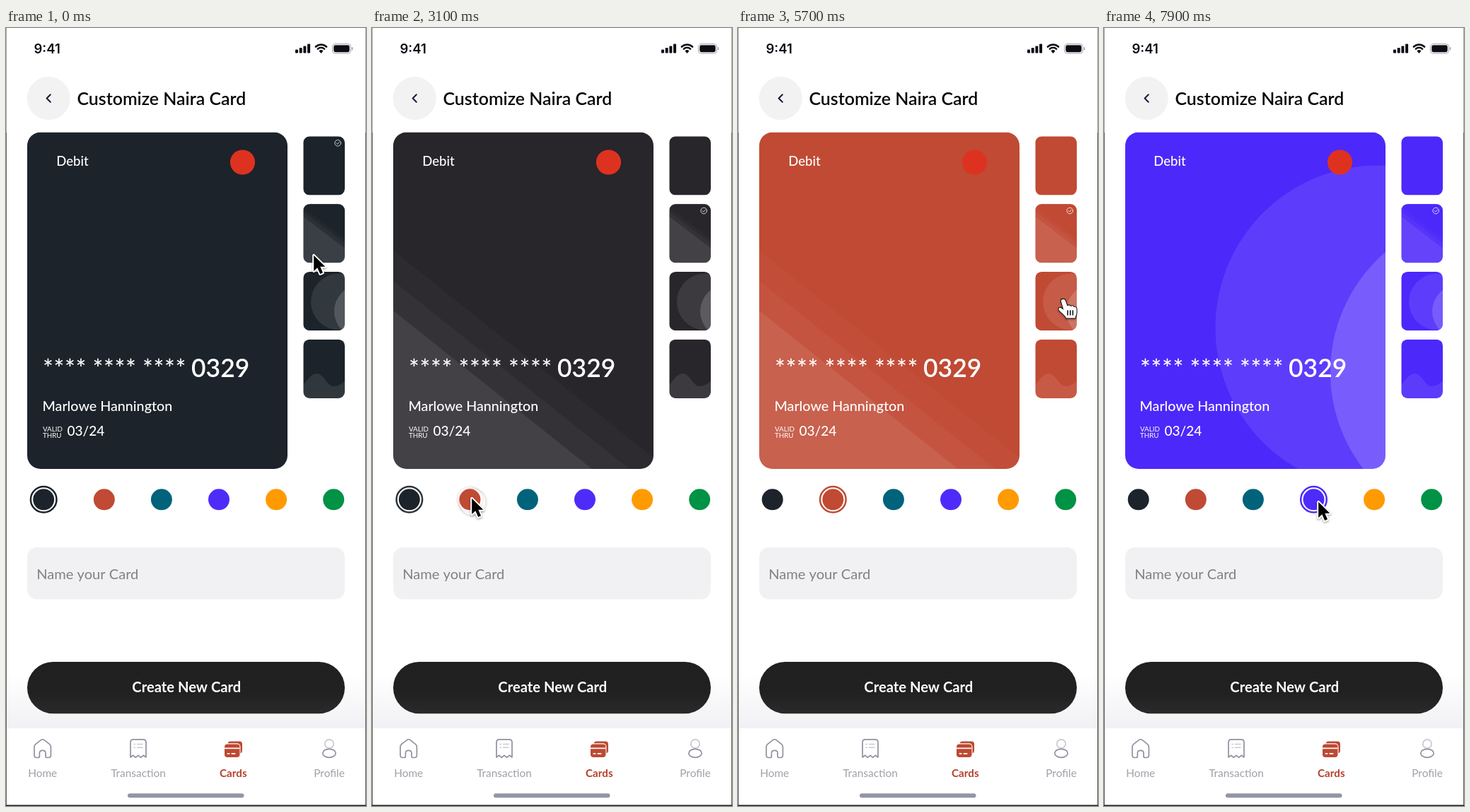
An HTML page with a canvas that plays this animation: 509 px wide and 1101 px high, repeating every 8000 ms.

```html
<!DOCTYPE html>
<html lang="en">
<head>
<meta charset="utf-8">
<title>Customize card</title>
<style>
html, body { margin: 0; width: 100%; height: 100%; overflow: hidden; background: #fff; }
canvas { display: block; width: 509px; height: 1101px; }
</style>
</head>
<body>
<canvas id="stage"></canvas>
<script>
const W = 509, H = 1101, LOOP = 8000;
const canvas = document.getElementById('stage');
const ctx = canvas.getContext('2d');
const dpr = window.devicePixelRatio || 1;
canvas.width = W * dpr;
canvas.height = H * dpr;

const DARK = [28, 35, 42], RED = [192, 74, 52], INDIGO = [77, 40, 250];
const SWATCHES = [DARK, RED, [0, 99, 123], [79, 43, 250], [255, 154, 0], [0, 146, 69]];
const CARD = { x: 30, y: 147.5, w: 368, h: 476.5, r: 19 };
const THUMB = { x: 420.3, y: 153.3, w: 58.7, h: 83.3, step: 95.8 };

const clamp = v => Math.max(0, Math.min(1, v));
const span = (t, from, to) => clamp((t - from) / (to - from));
const smooth = p => p * p * (3 - 2 * p);
const easeIn = p => p * p;
const easeOut = p => 1 - (1 - p) ** 2;
const mix = (a, b, k) => a.map((v, i) => v + (b[i] - v) * k);
const rgb = c => `rgb(${c.map(Math.round).join(',')})`;
const white = a => `rgba(255,255,255,${a})`;

function box(x, y, w, h, r, fill) {
  ctx.beginPath();
  ctx.roundRect(x, y, w, h, r);
  ctx.fillStyle = fill;
  ctx.fill();
}

function disc(x, y, r, fill) {
  ctx.beginPath();
  ctx.arc(x, y, r, 0, Math.PI * 2);
  ctx.fillStyle = fill;
  ctx.fill();
}

function ring(x, y, r, color, width) {
  ctx.beginPath();
  ctx.arc(x, y, r, 0, Math.PI * 2);
  line(null, color, width);
}

function line(d, color, width) {
  ctx.strokeStyle = color;
  ctx.lineWidth = width;
  if (d) ctx.stroke(new Path2D(d));
  else ctx.stroke();
}

function text(str, x, y, size, color, weight = 400, align = 'left', family = 'Lato') {
  ctx.font = `${weight} ${size}px ${family}, sans-serif`;
  ctx.textAlign = align;
  ctx.fillStyle = color;
  ctx.fillText(str, x, y);
}

function faded(alpha, draw) {
  if (alpha <= 0) return;
  ctx.save();
  ctx.globalAlpha *= alpha;
  draw();
  ctx.restore();
}

function clipped(x, y, w, h, r, draw) {
  ctx.save();
  ctx.beginPath();
  ctx.roundRect(x, y, w, h, r);
  ctx.clip();
  draw();
  ctx.restore();
}

// Diagonal bands: everything below each sloped edge gets a little lighter.
function bands(x, w, bottom, edges, slope) {
  const alphas = [0.025, 0.036, 0.075];
  edges.forEach((y, i) => {
    ctx.beginPath();
    ctx.moveTo(x, y);
    ctx.lineTo(x + w, y + w * slope);
    ctx.lineTo(x + w, bottom + w);
    ctx.lineTo(x, bottom + w);
    ctx.fillStyle = white(alphas[i]);
    ctx.fill();
  });
}

function statusBar() {
  const ink = '#0e0d16';
  text('9:41', 39.5, 36, 18.5, ink, 600, 'left', 'Inter');
  [5, 7.5, 10, 13].forEach((h, i) => box(409 + i * 5.7, 35.5 - h, 4, h, 1, ink));
  const top = -Math.PI / 2;
  [11, 6.7].forEach(r => {
    ctx.beginPath();
    ctx.arc(445.5, 34.5, r, top - 0.76, top + 0.76);
    line(null, ink, 2.6);
  });
  ctx.beginPath();
  ctx.moveTo(445.5, 36);
  ctx.arc(445.5, 35.5, 4.3, top - 0.76, top + 0.76);
  ctx.fillStyle = ink;
  ctx.fill();
  ctx.beginPath();
  ctx.roundRect(461.5, 22.5, 26, 13.5, 4);
  line(null, '#a5a5a9', 1);
  box(463.3, 24.3, 22.4, 9.9, 2.4, ink);
  box(488.8, 27, 1.6, 4.6, 0.8, '#a5a5a9');
}

function header() {
  disc(60.3, 99.5, 30.5, '#f2f2f3');
  line('M62.8 94.3 L57.6 99.5 L62.8 104.7', '#1b1938', 2);
  text('Customize Naira Card', 100.5, 108.5, 24.9, '#080808', 600);
}

function card(s) {
  const { x, y, w, h, r } = CARD;
  clipped(x, y, w, h, r, () => {
    ctx.fillStyle = rgb(s.tint);
    ctx.fillRect(x, y, w, h);
    faded(s.stripes * (1 - s.circles), () => {
      faded(1 - s.red * 12, () => {
        ctx.fillStyle = '#21242c';
        ctx.fillRect(x, y, w, h);
      });
      bands(x, w, y + h, [315, 358, 400], 0.797);
    });
    faded(s.circles, () => {
      const dx = -70 * s.slide - s.indigo, dy = 28 * s.slide;
      disc(388 + dx, 424 + dy, 229.5, white(0.094));
      disc(545 + dx, 487 + dy, 224, white(0.17));
    });
  });

  ctx.save();
  ctx.translate(-s.indigo, 0);
  disc(334.5, 190, 17.6, '#de3220');
  text('Debit', 71.3, 195, 18.5, '#fff', 500);
  for (let i = 0; i < 12; i++) {
    text('*', 59.5 + (i % 4) * 15.5 + Math.floor(i / 4) * 70.5, 494, 35, '#fff', 500, 'center');
  }
  text('0329', 262, 494, 35.5, '#fff', 600);
  text('Marlowe Hannington', 51.5, 542, 19.7, '#fff', 500);
  text('VALID', 52, 571, 9.8, '#fff');
  text('THRU', 52, 580.3, 9.8, '#fff');
  text('03/24', 86.5, 576.5, 19, '#fff', 500);
  ctx.restore();
}

function check(y) {
  ring(469.2, y, 4.3, white(0.85), 0.9);
  line(`M467.2 ${y} l1.5 1.6 l2.7 -3`, white(0.85), 0.9);
}

function thumbs(s) {
  const { x, y, w, h, step } = THUMB;
  const art = [
    () => {},
    () => bands(x, w, y + step + h, [254, 260, 267], 0.76),
    () => {
      disc(471, 387.5, 40, white(0.095));
      disc(502, 401, 38, white(0.16));
    },
    () => {
      ctx.fillStyle = white(0.09);
      ctx.fill(new Path2D('M420 507 C426 496 433 489 440 489 C449 489 454 507 463 507 C470 507 475 503 480 499 V525 H420 Z'));
    }
  ];
  art.forEach((draw, i) => {
    clipped(x, y + i * step, w, h, 9, () => {
      ctx.fillStyle = rgb(s.tint);
      ctx.fillRect(x, y + i * step, w, h);
      draw();
    });
  });
  faded(1 - s.stripes, () => check(162.8));
  faded(s.stripes, () => check(258.6));
}

function swatches(s) {
  const y = 667.3;
  const chosen = [1 - s.red, s.red - s.indigo, 0, s.indigo, 0, 0];
  faded(s.press, () => {
    ctx.shadowColor = 'rgba(60,30,30,.35)';
    ctx.shadowBlur = 4 * dpr;
    disc(142, 671, 18.5, '#fff');
  });
  let left = 33.7;
  SWATCHES.forEach((color, i) => {
    const width = 30 + 9 * chosen[i];
    const x = left + width / 2;
    faded(chosen[i], () => ring(x, y, 18.3, rgb(color), 2.5));
    disc(x, y, 15, rgb(color));
    left += width + 51.1;
  });
}

function form() {
  box(30, 735, 449, 73.5, 14, '#f1f1f3');
  text('Name your Card', 43.3, 779.5, 20.1, '#808085');
  const haze = ctx.createLinearGradient(0, 915, 0, 991);
  haze.addColorStop(0, '#fff');
  haze.addColorStop(1, '#f1f0f4');
  ctx.fillStyle = haze;
  ctx.fillRect(0, 915, W, 76);
  const shade = ctx.createLinearGradient(0, 897, 0, 970);
  shade.addColorStop(0, '#202020');
  shade.addColorStop(0.6, '#212121');
  shade.addColorStop(1, '#2a2a2a');
  box(30, 897, 449, 73.3, 36.6, shade);
  text('Create New Card', 255.3, 940, 20.2, '#fff', 700, 'center');
}

function nav() {
  const grey = '#9190a1', pale = '#c9c9d0', accent = '#bd4932';
  ctx.fillStyle = '#fff';
  ctx.fillRect(0, 991, W, 110);

  line('M40 1017.5 Q40 1015 42 1013.3 L49 1007.8 Q51.7 1005.7 54.4 1007.8 L61.4 1013.3 Q63.4 1015 63.4 1017.5 V1029 Q63.4 1032.5 60 1032.5 H58 Q56 1032.5 56 1030.5 V1026 Q56 1022.3 51.7 1022.3 Q47.4 1022.3 47.4 1026 V1030.5 Q47.4 1032.5 45.4 1032.5 H43.4 Q40 1032.5 40 1029 Z', grey, 1.7);
  line('M176 1011 Q176 1006.8 180 1006.8 H194 Q198 1006.8 198 1011 V1032 L194.3 1029.3 L190.7 1032.3 L187 1029.3 L183.3 1032.3 L179.7 1029.3 L176 1032 Z', grey, 1.7);
  line('M181 1013.5 h1.5 M185.5 1013.5 h7.5 M181 1018.3 h1.5 M185.5 1018.3 h7.5', pale, 1.5);

  box(313.5, 1009.5, 20.5, 17, 4, accent);
  box(308, 1012.3, 23.5, 20.7, 5, '#fff');
  box(309, 1013.5, 21.5, 18.5, 4, accent);
  ctx.fillStyle = '#fff';
  ctx.fillRect(309, 1018.5, 21.5, 1.7);
  box(312.5, 1026, 4, 1.7, 0.8, '#fff');
  box(318.5, 1026, 6, 1.7, 0.8, '#fff');

  ring(457, 1013, 6.2, pale, 1.7);
  ctx.beginPath();
  ctx.ellipse(457, 1026.3, 9.2, 6, 0, 0, Math.PI * 2);
  line(null, grey, 1.7);

  [['Home', 51.7], ['Transaction', 187], ['Profile', 457]].forEach(([label, x]) =>
    text(label, x, 1060, 15.4, '#a0a1aa', 400, 'center'));
  text('Cards', 321.3, 1060, 15.2, '#b6432d', 700, 'center');
  box(172, 1083.3, 164.5, 6, 3, '#9096a6');
}

function frameEdges() {
  [0, 508].forEach(x => {
    ctx.fillStyle = '#a8a8a8';
    ctx.fillRect(x, 0, 1, 148);
    ctx.fillStyle = '#626262';
    ctx.fillRect(x, 148, 1, H - 148);
  });
  ctx.fillStyle = '#1c1c1c';
  ctx.fillRect(0, 1099.5, W, 1.5);
}

// time, x, y, easing used to get there
const PATH = [
  [0, 434, 320, smooth], [400, 452, 300, smooth], [1350, 452, 300, smooth],
  [1800, 251, 505, easeIn], [2600, 140, 664, easeOut], [3400, 140, 664, smooth],
  [4700, 460, 384, smooth], [5750, 460, 384, smooth], [6200, 358, 562, easeIn],
  [7000, 301, 674, easeOut], [7500, 301, 674, smooth], [7900, 302, 669, smooth],
  [LOOP, 302, 669, smooth]
];
const HAND_TIMES = [[300, 1350], [2500, 3000], [4500, 5750], [6900, 7500]];

const ARROW = new Path2D('M1.2 1.8 V24 L6.3 19.3 L10.2 28 L14 26.3 L10.3 17.8 H17.3 Z');
const HAND = new Path2D('M-3.2 2.6 C-3.4 -1 1.8 -1.4 3 2 L5.6 9.6 C7.2 7.8 10 8.2 10.6 10.2 C12.2 8.7 14.4 9.2 15 11.2 C17 10.2 18.6 11.6 18.6 13.8 V19 C18.6 22.5 16.8 23.5 16.8 26.5 H4 C3 22.5 -2.4 19.6 -6 15.4 C-8 12.6 -4.8 10.8 -2.4 12.8 L0.4 14.8 Z');

function pointer(t) {
  const i = Math.max(1, PATH.findIndex(k => k[0] > t));
  const from = PATH[i - 1], to = PATH[i];
  const p = to[3](span(t, from[0], to[0]));
  const hand = HAND_TIMES.some(([a, b]) => t >= a && t < b);
  ctx.save();
  ctx.translate(from[1] + (to[1] - from[1]) * p, from[2] + (to[2] - from[2]) * p);
  ctx.shadowColor = 'rgba(0,0,0,.35)';
  ctx.shadowBlur = 3 * dpr;
  ctx.shadowOffsetY = 1.5 * dpr;
  const shape = hand ? HAND : ARROW;
  ctx.strokeStyle = hand ? '#000' : '#fff';
  ctx.lineWidth = hand ? 1.8 : 4;
  ctx.stroke(shape);
  ctx.shadowColor = 'transparent';
  ctx.fillStyle = hand ? '#fff' : '#000';
  ctx.fill(shape);
  if (hand) line('M6.2 16 V22 M9.8 16 V22 M13.4 16 V22', '#000', 1.5);
  ctx.restore();
}

function stateAt(t) {
  const red = smooth(span(t, 3032, 3432));
  const indigo = smooth(span(t, 7500, 7880));
  return {
    red,
    indigo,
    tint: mix(mix(DARK, RED, red), INDIGO, indigo),
    stripes: smooth(span(t, 1350, 1750)),
    circles: easeOut(span(t, 5750, 6100)),
    slide: (1 - span(t, 5850, 6450)) ** 3,
    press: span(t, 3020, 3070) * (1 - span(t, 3130, 3300))
  };
}

function draw(now) {
  const t = now % LOOP;
  const s = stateAt(t);
  ctx.setTransform(dpr, 0, 0, dpr, 0, 0);
  ctx.lineCap = ctx.lineJoin = 'round';
  ctx.fillStyle = '#fff';
  ctx.fillRect(0, 0, W, H);
  statusBar();
  header();
  card(s);
  thumbs(s);
  swatches(s);
  form();
  nav();
  frameEdges();
  pointer(t);
}

const start = performance.now();
function tick() {
  draw(performance.now() - start);
  requestAnimationFrame(tick);
}
tick();
</script>
</body>
</html>
```
